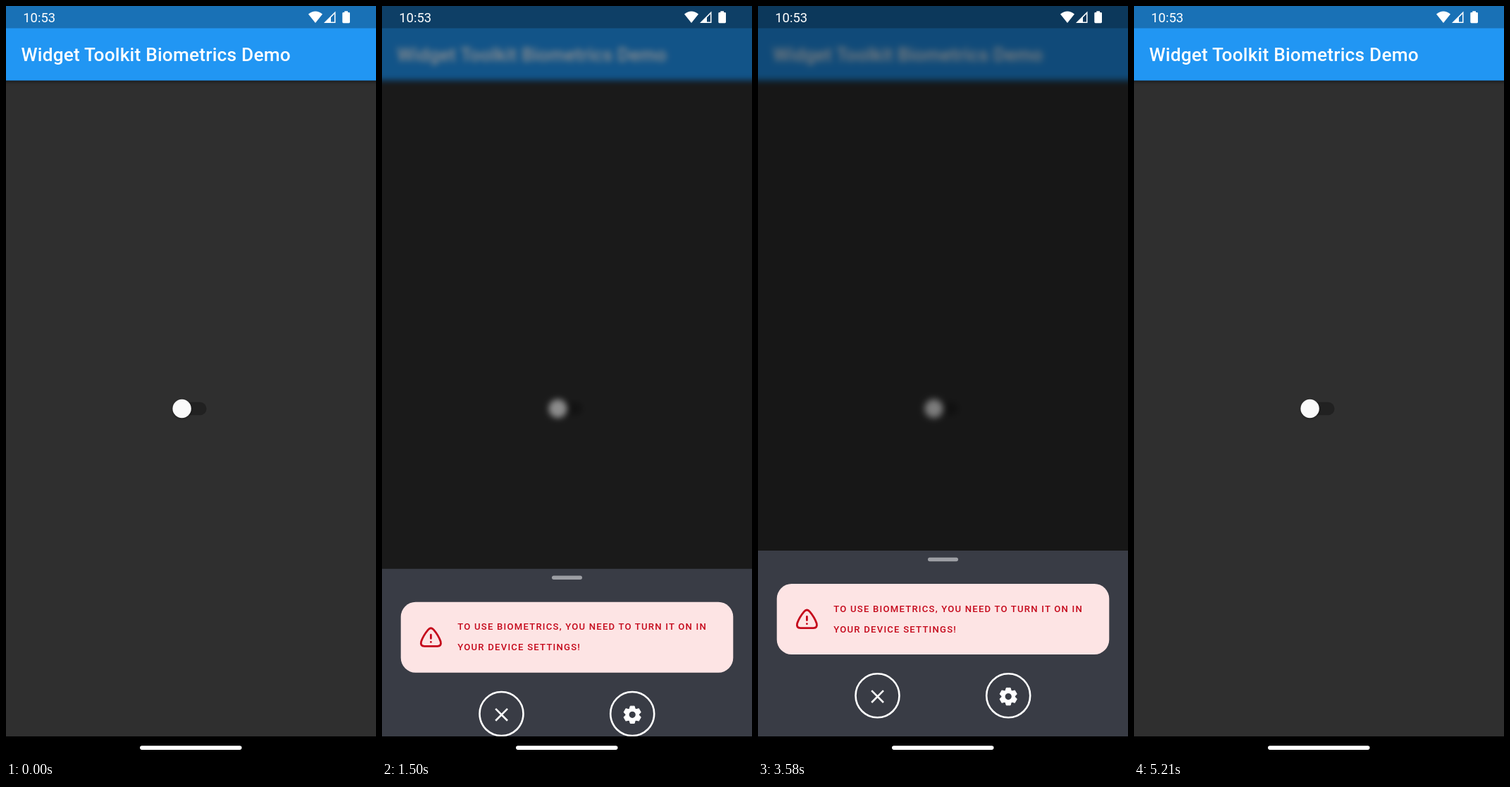
Animation, 525 px wide and 1066 px high, one loop 5.37 s. Source, as an HTML page:

```html
<!DOCTYPE html>
<html lang="en">
<head>
<meta charset="utf-8">
<title>Biometrics demo</title>
<style>
  html, body { margin: 0; width: 100%; height: 100%; overflow: hidden; background: #000; }
  svg { display: block; width: 100%; height: 100%; }
  text { font-family: Roboto, sans-serif; fill: #fff; }
  .title { font-size: 26.25px; font-weight: 500; letter-spacing: .197px; }
  .clock { font-size: 18.375px; }
  .alert { font-size: 13.125px; font-weight: 500; letter-spacing: 1.22px; fill: #c5081b; }
  .bar { filter: drop-shadow(0 2px 2px rgba(0, 0, 0, .45)); }
  .thumb { filter: drop-shadow(0 1.5px 1.5px rgba(0, 0, 0, .45)); }
  .line { fill: none; stroke: #fff; stroke-width: 2.6; }
  .warn { fill: none; stroke: #c5081b; stroke-width: 2.8; stroke-linecap: round; stroke-linejoin: round; }
</style>
</head>
<body>
<svg viewBox="0 0 525 1066">
  <defs>
    <path id="tooth" d="M-4.4-7L-2.9-12.2H2.9L4.4-7Z" fill="#fff" stroke="#fff" stroke-width="1" stroke-linejoin="round"/>
  </defs>

  <g id="page">
    <rect x="-40" y="-40" width="605" height="1146" fill="#2f2f2f"/>
    <rect class="bar" x="-40" y="-40" width="605" height="145.5" fill="#2196f3"/>
    <text class="title" x="21.5" y="78.3">Widget Toolkit Biometrics Demo</text>
    <rect x="241" y="560.8" width="43.5" height="18.4" rx="9.2" fill="#212121"/>
    <circle class="thumb" cx="249.6" cy="570" r="13.2" fill="#fafafa"/>
  </g>
  <rect id="dim" width="525" height="1066"/>

  <rect width="525" height="31.5" opacity=".25"/>
  <text class="clock" x="24.3" y="23">10:53</text>
  <g fill="#fff">
    <path d="M429 11.6Q439 3.6 449 11.6L439 24Z"/>
    <path fill-rule="evenodd" d="M467.5 7.5V24H451ZM466 11.2L461 16.2V22.5H466Z"/>
    <path d="M480.3 9V7.2H485V9H486.6Q488 9 488 10.4V22.8Q488 24.2 486.6 24.2H478.7Q477.3 24.2 477.3 22.8V10.4Q477.3 9 478.7 9Z"/>
  </g>

  <g id="sheet">
    <rect y="771" width="525" height="295" fill="#393c45"/>
    <rect x="241" y="780.8" width="43" height="5.4" rx="2.7" fill="#9d9fa4"/>
    <rect x="26.7" y="818" width="471.6" height="100" rx="21" fill="#fde4e4"/>
    <g class="warn">
      <path d="M65.4 857.4Q69.4 852.6 73.4 857.4Q80 865 83.2 874Q84.8 880.4 78.6 880.6H60.2Q54 880.4 55.6 874Q58.8 865 65.4 857.4Z"/>
      <path d="M69.4 864.4V869.6M69.4 874.6V874.7"/>
    </g>
    <text class="alert" x="107.3" y="857.7">TO USE BIOMETRICS, YOU NEED TO TURN IT ON IN</text>
    <text class="alert" x="107.3" y="886.5">YOUR DEVICE SETTINGS!</text>
    <g class="line">
      <circle cx="169.5" cy="976.3" r="31"/>
      <circle cx="355.2" cy="976.3" r="31"/>
      <path d="M161.2 969.2L178 986M178 969.2L161.2 986"/>
    </g>
    <g id="gear" transform="translate(355.2 977.6)">
      <circle r="7.1" fill="none" stroke="#fff" stroke-width="5"/>
    </g>
  </g>

  <rect y="1034" width="525" height="32"/>
  <rect x="190" y="1047.3" width="144.5" height="5.6" rx="2.8" fill="#fff"/>
</svg>
<script>
const LOOP = 5370, STEP = 1000 / 24;
const OPEN = 1350, OPEN_MS = 250, CLOSE = 3603, CLOSE_MS = 200;
const SHEET_H = 263, BLUR = 5, DIM = .5;
const [page, dim, sheet, gear] = ['page', 'dim', 'sheet', 'gear'].map(id => document.getElementById(id));

for (let i = 0; i < 6; i++) {
  const tooth = document.createElementNS('http://www.w3.org/2000/svg', 'use');
  tooth.setAttribute('href', '#tooth');
  tooth.setAttribute('transform', `rotate(${i * 60})`);
  gear.append(tooth);
}

const clamp = v => Math.min(1, Math.max(0, v));

// CSS-style cubic Bézier easing, solved by bisection
function bezier(x1, y1, x2, y2) {
  const at = (a, b, s) => 3 * (1 - s) ** 2 * s * a + 3 * (1 - s) * s * s * b + s ** 3;
  return x => {
    if (x <= 0 || x >= 1) return clamp(x);
    let lo = 0, hi = 1;
    for (let i = 0; i < 30; i++) {
      const mid = (lo + hi) / 2;
      if (at(x1, x2, mid) < x) lo = mid; else hi = mid;
    }
    return at(y1, y2, lo);
  };
}
const decelerate = bezier(0, 0, .2, 1);
const ease = bezier(.25, .1, .25, 1);

function draw(now) {
  // the screen refreshes 24 times a second
  const t = Math.floor((now % LOOP + 5) / STEP) * STEP;
  const v = clamp((t - OPEN) / OPEN_MS) - clamp((t - CLOSE) / CLOSE_MS);
  const shown = decelerate(v);
  sheet.setAttribute('transform', `translate(0 ${SHEET_H * (1 - shown)})`);
  dim.setAttribute('opacity', DIM * ease(v));
  page.style.filter = shown ? `blur(${BLUR * shown}px)` : 'none';
}

const start = performance.now();
function tick() {
  draw(performance.now() - start);
  requestAnimationFrame(tick);
}
tick();
</script>
</body>
</html>
```
